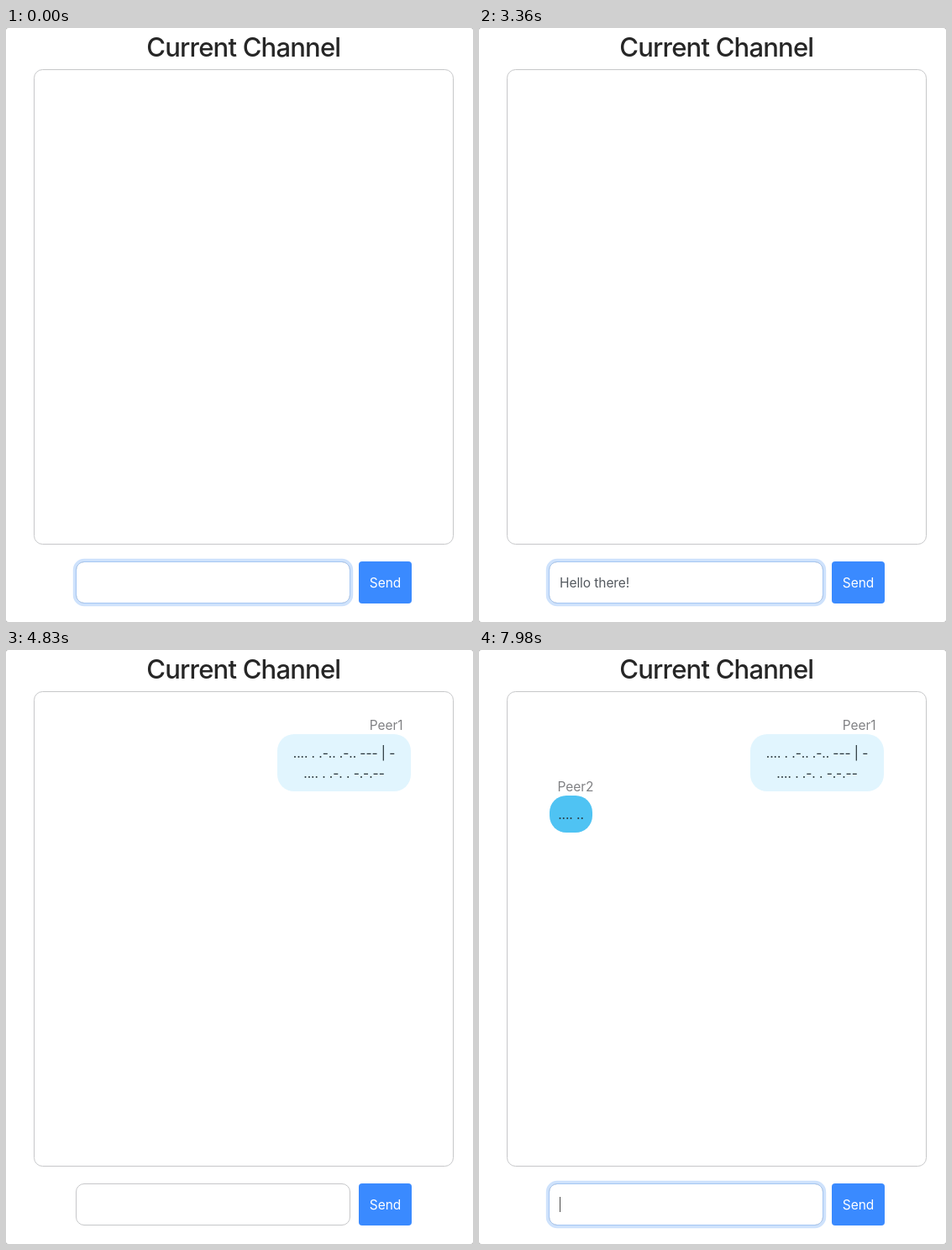
Recreate the animation shown at these times as an HTML page. Size 556x706 px, loop 8 s.

```html
<!DOCTYPE html>
<html lang="en">
<head>
<meta charset="utf-8">
<title>Current Channel</title>
<style>
html, body { margin: 0; width: 100%; height: 100%; overflow: hidden; background: #b4b4b4; }
svg { display: block; width: 556px; height: 706px; }
text {
  font: 400 15.5px Inter, "Open Sans", sans-serif;
  font-optical-sizing: none;
  font-variant-ligatures: none;
  font-feature-settings: "calt" 0;
  letter-spacing: -.07px;
  white-space: pre;
}
.title { font-size: 31px; font-weight: 500; letter-spacing: -.8px; fill: #262626; }
.label { fill: #808184; }
.morse { fill: #263238; }
.typed { fill: #53585e; }
.mid { text-anchor: middle; }
.line { fill: #fff; stroke: #c6c7c9; }
</style>
</head>
<body>
<svg viewBox="0 0 556 706">
  <rect width="556" height="706" rx="3" fill="#fff"/>
  <text class="title mid" x="282.8" y="34">Current Channel</text>
  <rect class="line" x="33.5" y="49.5" width="499" height="564" rx="10"/>

  <g id="first">
    <text class="label" x="472.5" y="95" text-anchor="end">Peer1</text>
    <rect x="323" y="100" width="159" height="68" rx="20" fill="#e1f5fe"/>
    <text class="morse mid" x="402.5" y="128">.... . .-.. .-.. --- | -</text>
    <text class="morse mid" x="402.5" y="152">.... . .-. . -.-.--</text>
  </g>
  <g id="second">
    <text class="label" x="93.5" y="168">Peer2</text>
    <rect x="84" y="173" width="51" height="44" rx="20" fill="#4fc3f3"/>
    <text class="morse mid" x="109.5" y="201">.... ..</text>
  </g>

  <rect class="line" x="83.5" y="634.5" width="326" height="49" rx="9.5"/>
  <g id="focus" fill="none">
    <rect x="81.4" y="632.4" width="330.2" height="53.2" rx="11.6" stroke="#cee2fc" stroke-width="3.2"/>
    <rect x="83.5" y="634.5" width="326" height="49" rx="9.5" stroke="#a5c6f2"/>
  </g>
  <text class="typed" id="typed" x="96" y="665"></text>
  <rect id="caret" y="650" width="1" height="18" fill="#4a4a4a"/>

  <rect x="420" y="634" width="63" height="50" rx="4" fill="#3a8aff"/>
  <text class="mid" x="451.5" y="665" fill="#fff">Send</text>
</svg>
<script>
const LOOP = 8000, FADE = 150, SENT = 3640, REPLY = 5880, BLUR = 4670, FOCUS = 7470;
const MESSAGE = "Hello there!";
const KEYS = [70, 350, 490, 630, 840, 910, 1890, 2030, 2170, 2240, 2380, 2870];
const CARET = [[70, 1470], [1890, 3360], [SENT, 4130], [7490, LOOP]];

const [first, second, focus, typed, caret] =
  ["first", "second", "focus", "typed", "caret"].map(id => document.getElementById(id));

const show = (el, on) => el.setAttribute("visibility", on ? "visible" : "hidden");
const ease = (t, start) => {
  const p = Math.min(1, Math.max(0, (t - start) / FADE));
  return p * p * (3 - 2 * p);
};

function draw(t) {
  const count = t < SENT ? KEYS.filter(k => k <= t).length : 0;
  const text = MESSAGE.slice(0, count);
  if (typed.textContent !== text) typed.textContent = text;
  const width = count ? typed.getComputedTextLength() : 0;
  caret.setAttribute("x", Math.round(96 + width));
  show(caret, CARET.some(([a, b]) => t >= a && t < b));
  show(first, t >= SENT);
  show(second, t >= REPLY);
  focus.setAttribute("opacity", 1 - ease(t, BLUR) + ease(t, FOCUS));
}

const begin = performance.now();
function tick() {
  draw((performance.now() - begin) % LOOP);
  requestAnimationFrame(tick);
}
draw(0);
requestAnimationFrame(tick);
</script>
</body>
</html>
```
